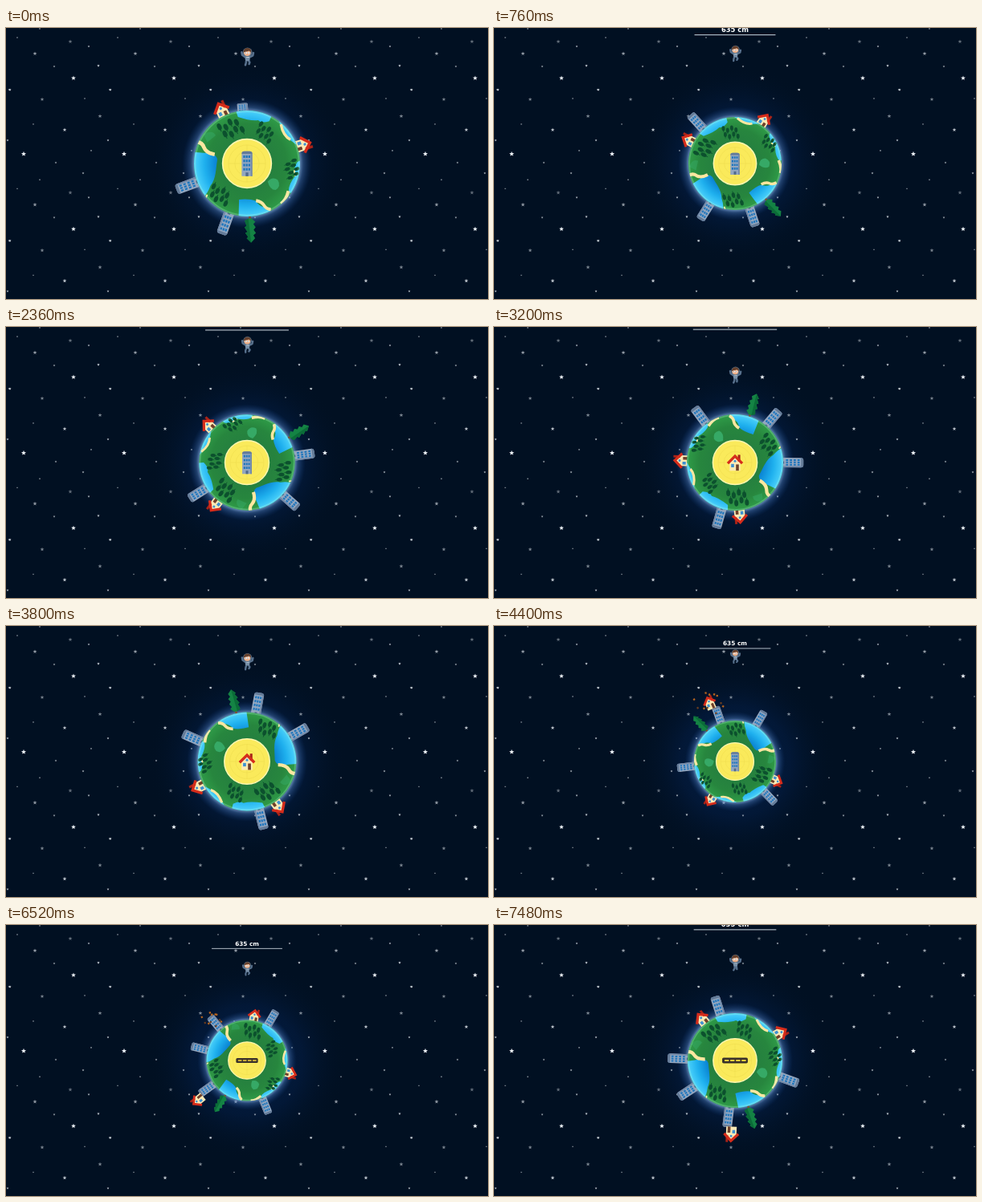
An HTML page that plays this animation: 600 px wide and 338 px high, repeating every 7520 ms.

```html
<!DOCTYPE html>
<html lang="en">
<head>
<meta charset="utf-8">
<title>Little planet</title>
<style>
  html, body { margin: 0; width: 100%; height: 100%; overflow: hidden; background: #011022; }
  svg { display: block; width: 100%; height: 100%; }
  text { font: bold 14.5px "DejaVu Sans", sans-serif; }
</style>
</head>
<body>
<svg viewBox="0 0 600 338">
  <defs>
    <radialGradient id="space"><stop offset="0" stop-color="#052b66"/><stop offset=".55" stop-color="#04204c" stop-opacity=".75"/><stop offset="1" stop-color="#011022" stop-opacity="0"/></radialGradient>
    <radialGradient id="halo"><stop offset=".8" stop-color="#a9d4ff" stop-opacity=".75"/><stop offset=".87" stop-color="#5585c8" stop-opacity=".38"/><stop offset="1" stop-color="#17488f" stop-opacity="0"/></radialGradient>
    <radialGradient id="land"><stop offset=".45" stop-color="#25803f"/><stop offset=".75" stop-color="#27863e"/><stop offset="1" stop-color="#2f9c48"/></radialGradient>
    <radialGradient id="sea" gradientUnits="userSpaceOnUse" cx="0" cy="0" r="100"><stop offset=".55" stop-color="#087fd0"/><stop offset=".8" stop-color="#1fb0ee"/><stop offset="1" stop-color="#4cd2fb"/></radialGradient>
    <clipPath id="disc"><circle r="100"/></clipPath>

    <!-- Objects stand on the origin and grow towards negative y. -->
    <g id="tower">
      <path d="M-10 3V-39Q-10 -44 -5 -44H5Q10 -44 10 -39V3Z" fill="#92a6bf"/>
      <path d="M-10 -39Q-10 -44 -5 -44H5Q10 -44 10 -39Z" fill="#647b98"/>
      <path d="M7 3V-39H10V3Z" fill="#7289a8"/>
      <path d="M-7 -34H6M-7 -26H6M-7 -18H6M-7 -10H6" stroke="#1d75bd" stroke-width="4.6" stroke-dasharray="3.4 1.4"/>
      <path d="M-2.500 3V-4H2.500V3Z" fill="#50698b"/>
    </g>
    <g id="house">
      <path d="M-11 3V-15L0 -25L11 -15V3Z" fill="#fdeab5"/>
      <path d="M6 -30H11V-16H6Z" fill="#a92318"/>
      <path d="M-15 -12L0 -27L15 -12" fill="none" stroke="#d52c1b" stroke-width="5.500"/>
      <path d="M2 3V-10H8V3Z" fill="#70402a"/>
      <path d="M-8 -11H-2V-4H-8Z" fill="#3d91d1"/>
      <circle cy="-17" r="2.500" fill="#3d91d1"/>
    </g>
    <g id="pine">
      <path d="M-2 3V-9H2V3Z" fill="#805030"/>
      <path d="M0 -52L8 -43L5 -41L10 -33L6 -31L11 -22L7 -20L10 -10L3 -6H-3L-10 -13L-6 -17L-10 -23L-6 -28L-10 -34L-5 -38L-8 -44Z" fill="#148344"/>
      <path d="M0 -52L8 -43L5 -41L10 -33L6 -31L11 -22L7 -20L10 -10L3 -6Z" fill="#0b6c38"/>
    </g>
    <g id="road">
      <rect x="-27" y="-6" width="54" height="12" rx="3" fill="#38312b"/>
      <path d="M-22 0H23" stroke="#f5cf3b" stroke-width="3" stroke-dasharray="9 3"/>
    </g>
  </defs>

  <rect width="600" height="338" fill="#011022"/>
  <circle cx="300" cy="169" r="125" fill="url(#space)" opacity=".65"/>
  <g id="stars"></g>

  <g id="world">
    <circle r="122" fill="url(#halo)"/>
    <g id="spin">
      <g id="items"></g>
      <circle r="100" fill="url(#land)"/>
      <g clip-path="url(#disc)">
        <g fill="url(#sea)" stroke="#ffe7a0">
          <path stroke="none" d="M-104 -22L-82 -20Q-57 -20 -56 -7C-59 10 -58 29 -69 42Q-74 57 -83 64L-110 40Z"/>
          <path stroke="none" d="M-16 110L-15 68Q5 66 17 71Q24 85 43 83L48 110Z"/>
          <path stroke="none" d="M55 -90L64 -72Q69 -51 82 -44L95 -34L116 -55Z"/>
          <path stroke="none" d="M-23 -105L-17 -88Q7 -80 21 -82Q27 -75 42 -80L55 -110Z"/>
          <path stroke="none" d="M110 -10L95 -3Q85 14 90 25Q77 41 79 55L112 60Z"/>
          <path fill="none" stroke-width="7" d="M-98 -40Q-85 -42 -81 -30Q-77 -20 -61 -17"/>
          <path fill="none" stroke-width="6" d="M17 70Q28 72 32 79T45 87"/>
          <path fill="none" stroke-width="5" d="M64 -74Q68 -52 82 -45"/>
          <path fill="none" stroke-width="6" d="M78 52Q74 69 64 76"/>
          <path fill="none" stroke-width="3" d="M-75 59L-80 70M89 12L91 24"/>
        </g>
        <g fill="#36a966">
          <path d="M39 34Q48 24 58 31Q65 43 54 50Q43 50 39 34Z"/>
          <path d="M-82 -55Q-65 -65 -59 -53L-75 -40Z" opacity=".5"/>
        </g>
        <g id="woods" fill="#0c512e"></g>
        <circle r="98" fill="none" stroke="#b9f5de" stroke-width="3" opacity=".25"/>
      </g>
    </g>
    <circle r="46" fill="#faea5b" stroke="#fff7ae" stroke-width="2.500"/>
    <g fill="none" stroke="#e9d64a" stroke-width="1" opacity=".65"><circle r="35"/><circle r="23"/><path d="M-35 0H35M0 -35V35"/></g>
    <use id="next"/>
    <g id="debris"></g>
    <g id="record">
      <path d="M-87 -276.500H87" stroke="#dce4ec" stroke-width="1.600"/>
      <text y="-283.500" text-anchor="middle" fill="#fff">635 cm</text>
    </g>
    <g id="player">
      <g id="limbs" fill="none" stroke="#58718d" stroke-width="4" stroke-linecap="round" stroke-linejoin="round">
        <path id="arms"/><path id="legs"/>
      </g>
      <rect x="-4.500" y="-2" width="9" height="11" rx="3" fill="#7890a8"/>
      <path d="M-2 2H3" stroke="#d7e2e9" stroke-width="2"/>
      <circle cy="-7" r="9" fill="#587088"/>
      <circle cx="-.5" cy="-6.500" r="6.500" fill="#efb18a"/>
      <path d="M-8 -7Q-7 -16 1 -15Q8 -14 7 -7L3 -10Z" fill="#65402c"/>
      <g id="face"><circle cx="-3" cy="-6" r="2" fill="#fff"/><circle cx="2" cy="-6" r="2" fill="#fff"/><path d="M-3.500 -6H-2.500M1.500 -6H2.500" stroke="#171b23" stroke-width="1.500"/></g>
    </g>
  </g>
</svg>
<script>
const LOOP = 7520, STEP = 40, SPIN = -49.87;
const NS = "http://www.w3.org/2000/svg";
const $ = id => document.getElementById(id);
const set = (el, attrs) => { for (const k in attrs) el.setAttribute(k, attrs[k]); return el; };
const add = (parent, tag, attrs) => parent.appendChild(set(document.createElementNS(NS, tag), attrs));
const clamp = v => Math.max(0, Math.min(1, v));

// One repeating tile of sky: x, y, radius, brightness
const TILE_W = 125, TILE_H = 188.3;
const sky = [
  [84, 62.5, 3, 1], [22, 157, 3.2, 1], [36, 32, 2.6, .6], [45, 89, 2.5, .5],
  [117, 110, 2.6, .5], [5, 77, 1.7, .9], [73, 127, 2.5, .8], [80, 17, 2.6, .4],
  [115, 47, 1.8, .8], [103, 23, 1.4, .8], [2, 140, 1.5, .8], [62, 168, 1.4, .7],
  [42, 1, 1.3, .6], [96, 181, 1.5, .7], [60, 48, 1.4, .7], [14, 12, 1.2, .6],
  [34, 120, 1.2, .6], [98, 88, 1.2, .6], [106, 153, 1.3, .7], [129, 77, 1.4, .7]
];
function starPath(x, y, r) {
  const pts = Array.from({ length: 10 }, (_, i) => {
    const a = i * Math.PI / 5 - Math.PI / 2, d = i % 2 ? r * .43 : r;
    return (x + d * Math.cos(a)).toFixed(2) + " " + (y + d * Math.sin(a)).toFixed(2);
  });
  return "M" + pts.join("L") + "Z";
}
for (const [x, y, r, opacity] of sky) {
  let d = "";
  for (let i = -1; i < 5; i++)
    for (let j = -1; j < 2; j++) d += starPath(x + i * TILE_W, y + j * TILE_H, r);
  add($("stars"), "path", { d, fill: "#f0f5fa", opacity });
}

// Groves: x, y, tilt, size
const groves = [[-34, -69, -24, 1.1], [34, -62, 35, .9], [87, 8, 72, .85], [-51, 63, 205, 1]];
for (const [x, y, tilt, size] of groves) {
  const g = add($("woods"), "g", { transform: `translate(${x} ${y}) rotate(${tilt}) scale(${size})` });
  for (let i = 0; i < 8; i++) {
    const cx = (i % 4) * 10 - 15 + (i > 3 ? 4 : 0), cy = (i > 3 ? 8 : -7) + (i % 2) * 5;
    add(g, "ellipse", { cx, cy, rx: 3.8, ry: 6 });
    add(g, "path", { d: `M${cx} ${cy}v9`, stroke: "#0c512e", "stroke-width": 1.3 });
  }
}

const items = [
  { kind: "house", angle: 244.5 }, { kind: "house", angle: 341.6 },
  { kind: "tower", angle: 159.7 }, { kind: "tower", angle: 109.8 },
  { kind: "pine", angle: 87 },
  { kind: "tower", angle: 265.5, born: -.03 },
  { kind: "tower", angle: 33, born: 2.47 },
  { kind: "house", angle: 106, born: 3.93, base: 143 },
  { kind: "tower", angle: 195, born: 5.71 }
];
for (const item of items) item.el = add($("items"), "use", { href: "#" + item.kind });

const bursts = [
  { start: 3.95, life: .8, angle: 106, dist: 158, reach: 37 },
  { start: 6.1, life: .7, angle: 195, dist: 134, reach: 23 }
];
for (const b of bursts) b.dots = Array.from({ length: 11 }, (_, i) =>
  add($("debris"), "rect", { width: 4.5, height: 4.5, fill: i % 3 ? "#b7651f" : "#683c20" }));

const radiusKeys = [
  [0, 66], [.75, 58], [1.52, 64], [1.7, 64.9], [2.3, 60], [2.75, 58.5], [3.04, 59], [3.2, 60],
  [3.52, 63], [3.84, 61], [4.4, 51], [4.55, 50.7], [5.28, 56.2], [5.42, 56.6], [5.7, 55.8],
  [6.12, 52.7], [6.52, 50.5], [6.62, 50.5], [6.84, 52.5], [7.48, 59]
];
const heightKeys = [
  [0, 203], [.5, 257], [1.44, 154], [1.52, 156], [2.2, 250], [3.2, 183], [3.42, 160],
  [4.25, 261], [5.28, 186], [5.44, 174], [6.15, 250], [6.52, 228], [7.15, 162], [7.48, 208]
];

// Cubic curve through the keys, flat at every turning point
function curve(keys, t) {
  const slope = i => (keys[i + 1][1] - keys[i][1]) / (keys[i + 1][0] - keys[i][0]);
  const tangent = i => {
    if (i === 0) return slope(0);
    if (i === keys.length - 1) return slope(i - 1);
    const a = slope(i - 1), b = slope(i);
    return a * b <= 0 ? 0 : 2 * a * b / (a + b);
  };
  let i = 0;
  while (i < keys.length - 2 && t > keys[i + 1][0]) i++;
  const [t0, a] = keys[i], [t1, b] = keys[i + 1];
  const h = t1 - t0, u = clamp((t - t0) / h), v = 1 - u;
  return a * v * v * (1 + 2 * u) + b * u * u * (3 - 2 * u) + h * u * v * (v * tangent(i) - u * tangent(i + 1));
}

function drawItem({ el, angle, born = -9, base = 98 }, t) {
  const u = clamp((t - born) / .3);
  const grow = u === 1 ? 1 : 1 + 2.2 * (u - 1) ** 3 + 1.2 * (u - 1) ** 2;
  set(el, {
    visibility: t < born ? "hidden" : "visible",
    transform: `rotate(${angle + 90}) translate(0 ${-base}) scale(1 ${Math.max(.03, grow)})`
  });
}

function drawBurst({ start, life, angle, dist, reach, dots }, t, turn) {
  const u = (t - start) / life, on = u >= 0 && u < 1;
  const a = (angle + turn) * Math.PI / 180;
  dots.forEach((dot, i) => {
    const dir = i * 2.4, far = reach * (.75 + .25 * Math.sin(i * 5)) * Math.sqrt(clamp(u * 1.6));
    set(dot, {
      visibility: on ? "visible" : "hidden",
      opacity: clamp((1 - u) * 3),
      transform: `translate(${dist * Math.cos(a) + far * Math.cos(dir)} ${dist * Math.sin(a) + far * Math.sin(dir)}) rotate(${i * 37})`
    });
  });
}

function drawNext(t) {
  const kind = t < 2.47 ? "tower" : t < 3.93 ? "house" : t < 5.71 ? "tower" : "road";
  const drop = { tower: 21, house: 14, road: 0 }[kind];
  set($("next"), { href: "#" + kind, transform: `translate(0 ${drop})` });
}

function drawPlayer(t) {
  const side = t > 1.25 && t < 1.8;
  const kick = Math.sin(t * 9) * 1.5;
  set($("player"), { transform: `translate(1 ${-curve(heightKeys, t)})` });
  set($("arms"), { d: side ? "M-2 1L-5 5M2 1L5 6" : "M-4 2L-10 -2L-11 -7M4 2L10 -1L11 -6" });
  set($("legs"), { d: side ? "M-1 8L-3 13L-6 16M2 8L2 14L5 16" : `M-2 8L${-3 - kick} 13L-4 17M2 8L${4 + kick} 12L3 15` });
  set($("face"), { transform: `translate(${side ? 3 : 0} 0)` });
}

function draw(t) {
  const turn = SPIN * t;
  set($("world"), { transform: `translate(300 169) scale(${curve(radiusKeys, t) / 100})` });
  set($("spin"), { transform: `rotate(${turn})` });
  items.forEach(item => drawItem(item, t));
  bursts.forEach(burst => drawBurst(burst, t, turn));
  drawNext(t);
  drawPlayer(t);
}

const began = performance.now();
function tick() {
  const ms = (performance.now() - began) % LOOP;
  draw(Math.floor(ms / STEP) * STEP / 1000);
  requestAnimationFrame(tick);
}
draw(0);
requestAnimationFrame(tick);
</script>
</body>
</html>
```
